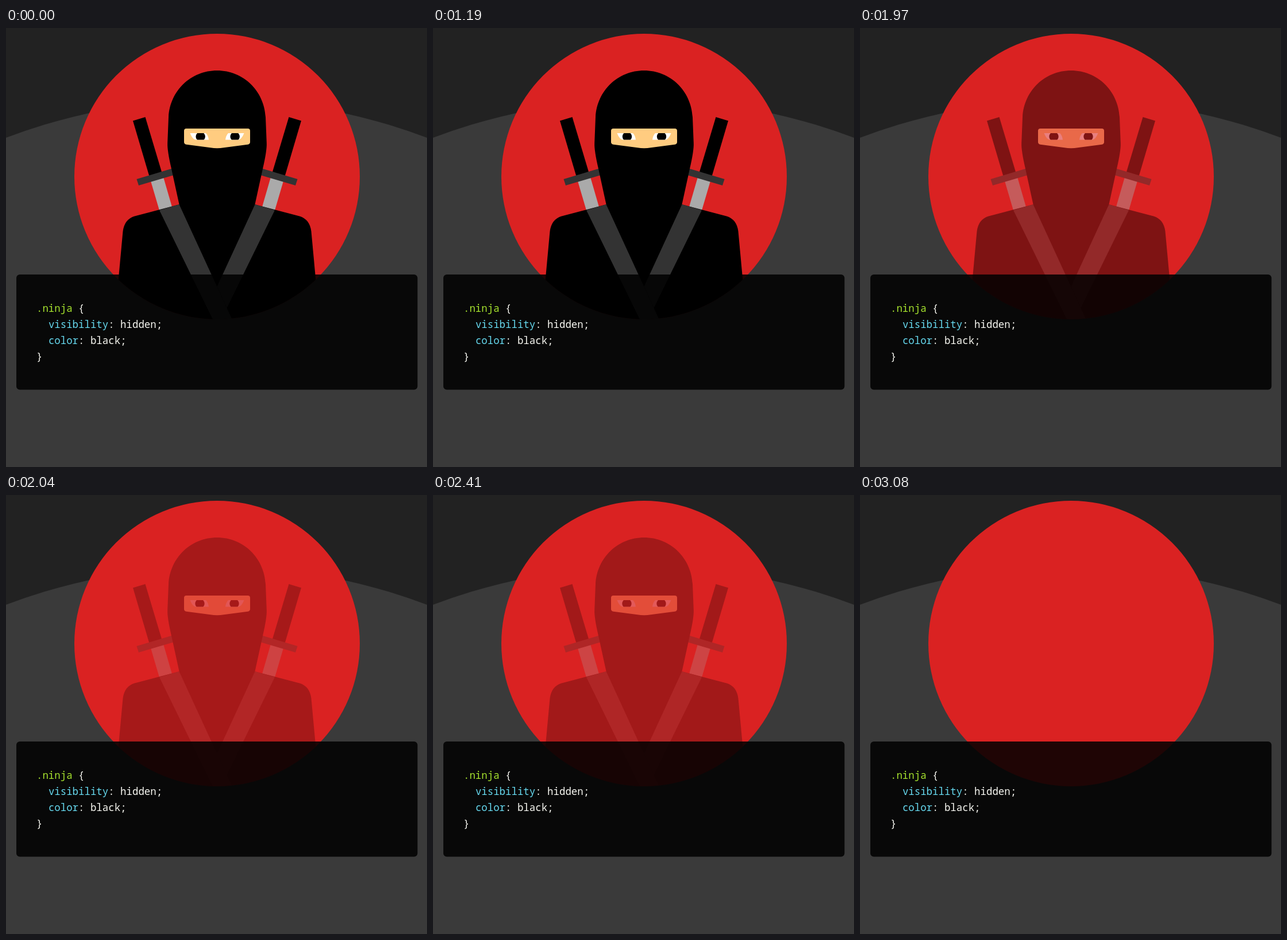
Write an HTML page with a canvas that moves like this. It is 733 by 764 pixels and loops after 3.3 s.

```html
<!DOCTYPE html>
<html lang="en">
<head>
<meta charset="utf-8">
<title>Ninja</title>
<style>
  html, body { margin: 0; width: 100%; height: 100%; overflow: hidden; background: #222; }
  canvas { position: absolute; left: 0; top: 0; }
  pre {
    position: absolute; left: 53px; top: 473px; margin: 0;
    font: 500 17.4px/28px "Noto Sans Mono", "DejaVu Sans Mono", monospace;
    color: #f8f8f2;
  }
  .sel { color: #a6e22e; }
  .prop { color: #66d9ef; }
</style>
</head>
<body>
<canvas id="stage" width="733" height="764"></canvas>
<pre><span class="sel">.ninja</span> {
  <span class="prop">visibility</span>: hidden;
  <span class="prop">color</span>: black;
}</pre>
<script>
const W = 733, H = 764, LOOP = 3300, AXIS = 367.5;
const ctx = document.getElementById('stage').getContext('2d');
const layer = document.createElement('canvas');
layer.width = W;
layer.height = H;
const ink = layer.getContext('2d');

const BODY = new Path2D(
  'M302 307 L224 327.5 Q206 333 203.5 354 L196 435 L190 515 H545 L539 435 ' +
  'L531.5 354 Q529 333 511 327.5 L433 307 Z');
const HEAD = new Path2D(
  'M367.5 74 C413 74 449.5 109 452 155 L453.8 200 Q454.5 213 447 245 L433 309 ' +
  'L433 330 H302 L302 309 L288 245 Q280.5 213 281.2 200 L283 155 C285.5 109 322 74 367.5 74 Z');
const FACE = new Path2D(
  'M314 175 H421 Q425 175 425 179 V198.5 Q425 202 421 202.7 L379 208.3 ' +
  'Q367.5 210 356 208.3 L314 202.7 Q310 202 310 198.5 V179 Q310 175 314 175 Z');
const EYE = new Path2D('M320.5 183 H348 Q352 187 353 194.5 H331 Q325 194.5 320.5 183 Z');

function poly(c, color, ...pts) {
  c.fillStyle = color;
  c.beginPath();
  for (let i = 0; i < pts.length; i += 2) c.lineTo(pts[i], pts[i + 1]);
  c.fill();
}

function disc(c, color, x, y, r) {
  c.fillStyle = color;
  c.beginPath();
  c.arc(x, y, r, 0, Math.PI * 2);
  c.fill();
}

function fill(c, color, path) {
  c.fillStyle = color;
  c.fill(path);
}

function mirrored(draw) {
  for (const flip of [false, true]) {
    ink.save();
    if (flip) ink.transform(-1, 0, 0, 1, 2 * AXIS, 0);
    draw(flip ? -1 : 1);
    ink.restore();
  }
}

function bounceOut(p) {
  p = Math.min(1, Math.max(0, p));
  const k = 7.5625, d = 2.75;
  if (p < 1 / d) return k * p * p;
  if (p < 2 / d) return k * (p - 1.5 / d) ** 2 + 0.75;
  if (p < 2.5 / d) return k * (p - 2.25 / d) ** 2 + 0.9375;
  return k * (p - 2.625 / d) ** 2 + 0.984375;
}

// Pupils glance right, then bounce back to rest.
function glance(t) {
  if (t < 60) t = 0;
  const f = t < 500 ? bounceOut((t + 100) / 600) : 1 - bounceOut((t - 500) / 1000);
  return 5.5 * f;
}

// The faintest part of the fade does not show.
function visibility(t) {
  const a = 1 - bounceOut((t - 1500) / 1700);
  return a < 0.065 ? 0 : a;
}

function drawNinja(shift) {
  ink.clearRect(0, 0, W, H);
  ink.save();
  ink.beginPath();
  ink.arc(AXIS, 258.5, 248.5, 0, Math.PI * 2);
  ink.clip();

  mirrored(() => {
    poly(ink, '#000', 221, 161.5, 242.5, 155, 271.5, 252, 249.5, 258);
    poly(ink, '#aaa', 251, 263, 273, 256, 289.5, 313, 267.5, 319);
    poly(ink, '#333', 227.5, 263, 296, 242.5, 299, 254, 231, 274);
  });
  fill(ink, '#000', BODY);
  fill(ink, '#000', HEAD);
  poly(ink, '#333', 433.5, 307, 468, 317, 384.6, 487, 367.5, 450);
  poly(ink, '#333', 267, 317, 301.5, 307, 394, 508, 360.5, 508);

  fill(ink, '#ffcc80', FACE);
  mirrored(side => {
    fill(ink, '#fff', EYE);
    ink.clip(EYE);
    disc(ink, '#000', 337.5 + side * shift, 189, 8.2);
  });
  ink.restore();
}

function render(t) {
  ctx.fillStyle = '#222';
  ctx.fillRect(0, 0, W, H);
  disc(ctx, '#3a3a3a', 366.5, 1159, 1035);
  disc(ctx, '#da2222', AXIS, 258.5, 248.5);

  const alpha = visibility(t);
  if (alpha > 0) {
    drawNinja(glance(t));
    ctx.globalAlpha = alpha;
    ctx.drawImage(layer, 0, 0);
    ctx.globalAlpha = 1;
  }

  ctx.fillStyle = 'rgba(0, 0, 0, 0.86)';
  ctx.beginPath();
  ctx.roundRect(18, 429, 698.5, 200.5, 6);
  ctx.fill();
}

const start = performance.now();
function tick() {
  render((performance.now() - start) % LOOP);
  requestAnimationFrame(tick);
}
tick();
</script>
</body>
</html>
```
